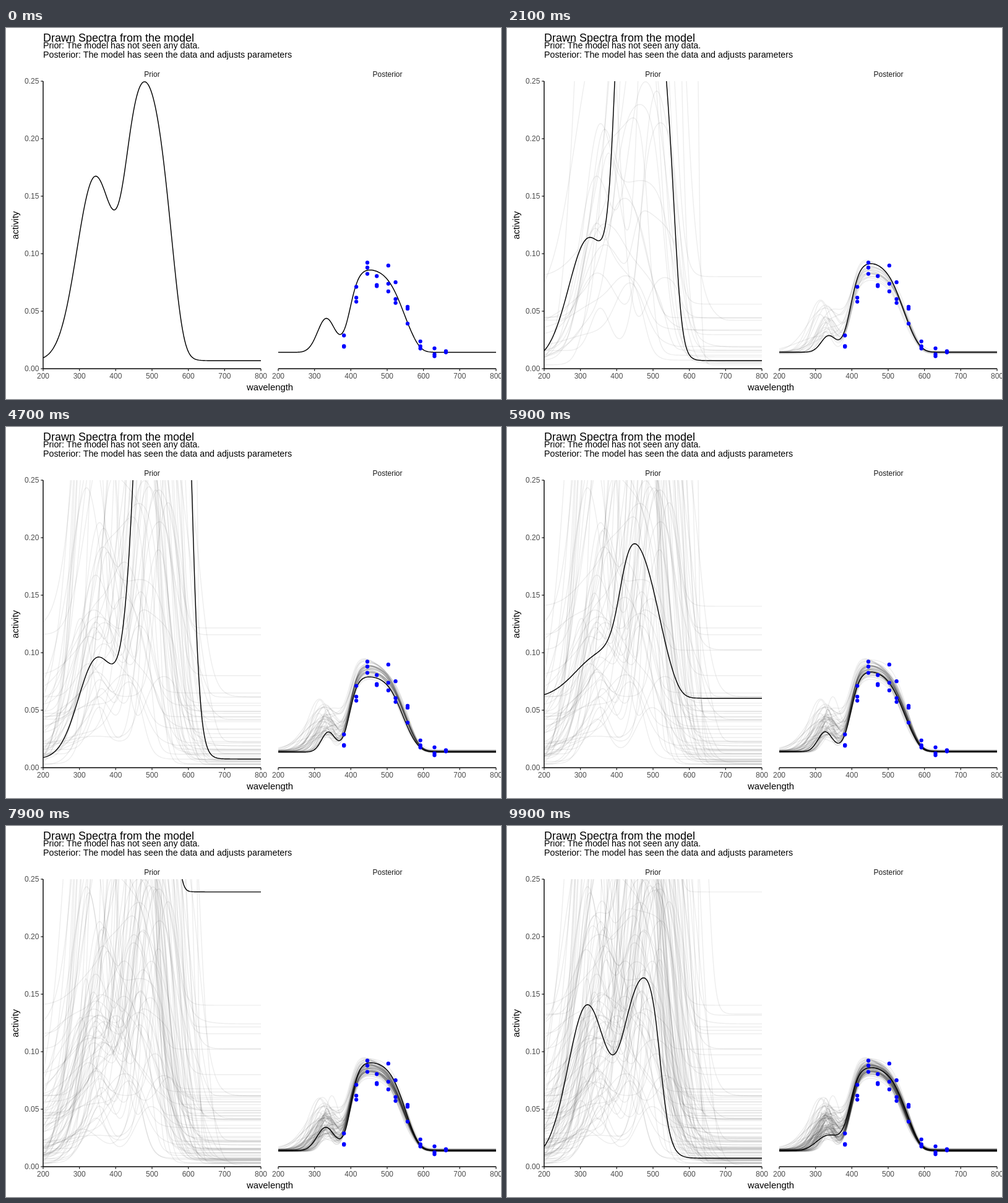
An HTML page for the animation above (10 s loop, 800x600 px).

```html
<!DOCTYPE html>
<html lang="en">
<head>
<meta charset="utf-8">
<title>Drawn Spectra from the model</title>
<style>
  html, body { margin: 0; width: 100%; height: 100%; overflow: hidden; background: #fff; }
  svg { display: block; font-family: "Liberation Sans", Arial, Helvetica, sans-serif; }
  .curve { fill: none; stroke: #000; stroke-width: 1.45; stroke-linejoin: round; visibility: hidden; }
  .past { visibility: visible; stroke-opacity: .07; }
  .now { visibility: visible; }
  .tick { stroke: #333; stroke-width: 1.42; }
  .axis { stroke: #000; stroke-width: 1.42; }
  .num { font-size: 12px; fill: #4d4d4d; }
  .strip { font-size: 12px; fill: #1a1a1a; }
  .title { font-size: 18px; }
  .sub { font-size: 14.25px; }
  .name { font-size: 14.85px; }
  .mid { text-anchor: middle; }
  .end { text-anchor: end; }
</style>
</head>
<body>
<svg id="stage" width="800" height="600" viewBox="0 0 800 600"></svg>
<script>
const STEP = 100, COUNT = 100;
const TOP = 86, BOTTOM = 551, WIDTH = 352;
const LEFT = [60, 440];
const stage = document.getElementById('stage');

const px = (wave, left) => left + (wave - 200) / 600 * WIDTH;
const py = activity => BOTTOM - activity / .25 * (BOTTOM - TOP);

function add(tag, attrs, parent = stage, text = '') {
  const el = document.createElementNS('http://www.w3.org/2000/svg', tag);
  for (const k in attrs) el.setAttribute(k, attrs[k]);
  el.textContent = text;
  parent.appendChild(el);
  return el;
}
const label = (x, y, cls, text, extra = {}) =>
  add('text', { x, y, class: cls, ...extra }, stage, text);
const line = (x1, y1, x2, y2, cls) => add('line', { x1, y1, x2, y2, class: cls });

let seed = 71;
function rand() {
  seed = seed + 0x6D2B79F5 | 0;
  let t = Math.imul(seed ^ seed >>> 15, 1 | seed);
  t = t + Math.imul(t ^ t >>> 7, 61 | t) ^ t;
  return ((t ^ t >>> 14) >>> 0) / 4294967296;
}
const bell = sd => sd * 2 * (rand() + rand() + rand() - 1.5);

// The first draw sits at the centre of each distribution (k = 0), the rest scatter (k = 1).
const skew = (k, centre, sd, bias = 0) => centre * Math.exp(k * (bias + bell(sd)));
const near = (k, centre, sd) => centre + k * bell(sd);

function drawPrior(k) {
  const move = k * bell(30);
  return {
    base: skew(k, .007, 1.1, 1.1),
    side: { mid: near(k, 342, 16), height: skew(k, .157, .9, -.5), half: skew(k, 58, .35) },
    height: skew(k, .27, .8),
    rise: { at: near(k, 427, 25) + move, rate: skew(k, .052, .3) },
    slope: { at: near(k, 547, 25) + move, rate: skew(k, .041, .35) },
    drop: { at: near(k, 570, 25) + move, rate: skew(k, .107, .35) }
  };
}
function drawPosterior(k) {
  return {
    base: near(k, .0142, .0006),
    side: { mid: near(k, 332, 9), height: skew(k, .0292, .35, -.15), half: skew(k, 28, .35, .15) },
    height: skew(k, .0741, .05),
    rise: { at: near(k, 397.5, 1.5), rate: skew(k, .08, .06) },
    slope: { at: near(k, 543, 4), rate: skew(k, .042, .05) },
    drop: { at: near(k, 574, 2), rate: skew(k, .12, .06) }
  };
}

// Side band: a bell. Main band: one rising and two falling exponentials in the divisor.
const grow = (w, { at, rate }) => Math.exp(rate * (w - at));
function spectrum(w, { base, side, height, rise, slope, drop }) {
  const bump = side.height * 2 ** -(((w - side.mid) / side.half) ** 2);
  return base + bump + height / (1 + 1 / grow(w, rise) + grow(w, slope) + grow(w, drop));
}
function trace(params, left) {
  const points = [];
  for (let w = 200; w <= 800; w += 3)
    points.push(px(w, left).toFixed(2) + ' ' + py(spectrum(w, params)).toFixed(2));
  return 'M' + points.join('L');
}

const panels = LEFT.map((x, i) => {
  const clip = add('clipPath', { id: 'panel' + i });
  add('rect', { x, y: TOP, width: WIDTH, height: BOTTOM - TOP }, clip);
  return add('g', { 'clip-path': `url(#panel${i})` });
});

const curves = Array.from({ length: COUNT }, (_, i) =>
  [drawPrior, drawPosterior].map((draw, p) =>
    add('path', { class: 'curve', d: trace(draw(i ? 1 : 0), LEFT[p]) }, panels[p])));

// Measurements: wavelength, then activities in thousandths
const DATA = [
  [381, 28.9, 19.7, 19.1], [415, 71.2, 61.8, 58.3], [445.5, 92.2, 87.9, 82.5],
  [471.4, 80.5, 72.8, 71.8], [503.2, 89.7, 73.9, 67.2], [523.2, 75.2, 60.5, 57.2],
  [556.3, 53.8, 52.2, 39.2], [591.5, 23.7, 19.6, 17.6], [630.4, 17.7, 12.6, 10.9],
  [661.9, 15.3, 14.2]
];
for (const [wave, ...values] of DATA)
  for (const v of values)
    add('circle', { cx: px(wave, LEFT[1]), cy: py(v / 1000), r: 3.15, fill: '#00f' }, panels[1]);

for (const left of LEFT) {
  line(left, BOTTOM, left + WIDTH, BOTTOM, 'axis');
  for (let wave = 200; wave <= 800; wave += 100) {
    const x = px(wave, left);
    line(x, BOTTOM, x, BOTTOM + 3.7, 'tick');
    label(x, 567, 'num mid', wave);
  }
}
for (let i = 0; i <= 5; i++) {
  const y = py(i * .05);
  line(56.3, y, 60, y, 'tick');
  label(53.4, y + 4.4, 'num end', (i * .05).toFixed(2));
}
line(60, TOP, 60, BOTTOM, 'axis');

label(236, 79, 'strip mid', 'Prior');
label(616.5, 79, 'strip mid', 'Posterior');
label(426.5, 586, 'name mid', 'wavelength');
label(0, 0, 'name mid', 'activity', { transform: 'translate(20 319) rotate(-90)' });
label(60, 33, 'sub', 'Prior: The model has not seen any data.');
label(60, 48, 'sub', 'Posterior: The model has seen the data and adjusts parameters');
label(60, 22, 'title', 'Drawn Spectra from the model');

let shown = -1;
function frame() {
  const now = Math.floor(performance.now() / STEP) % COUNT;
  if (now !== shown) {
    shown = now;
    curves.forEach((pair, i) => {
      const cls = i < now ? 'curve past' : i === now ? 'curve now' : 'curve';
      for (const c of pair) c.setAttribute('class', cls);
    });
  }
  requestAnimationFrame(frame);
}
frame();
</script>
</body>
</html>
```
